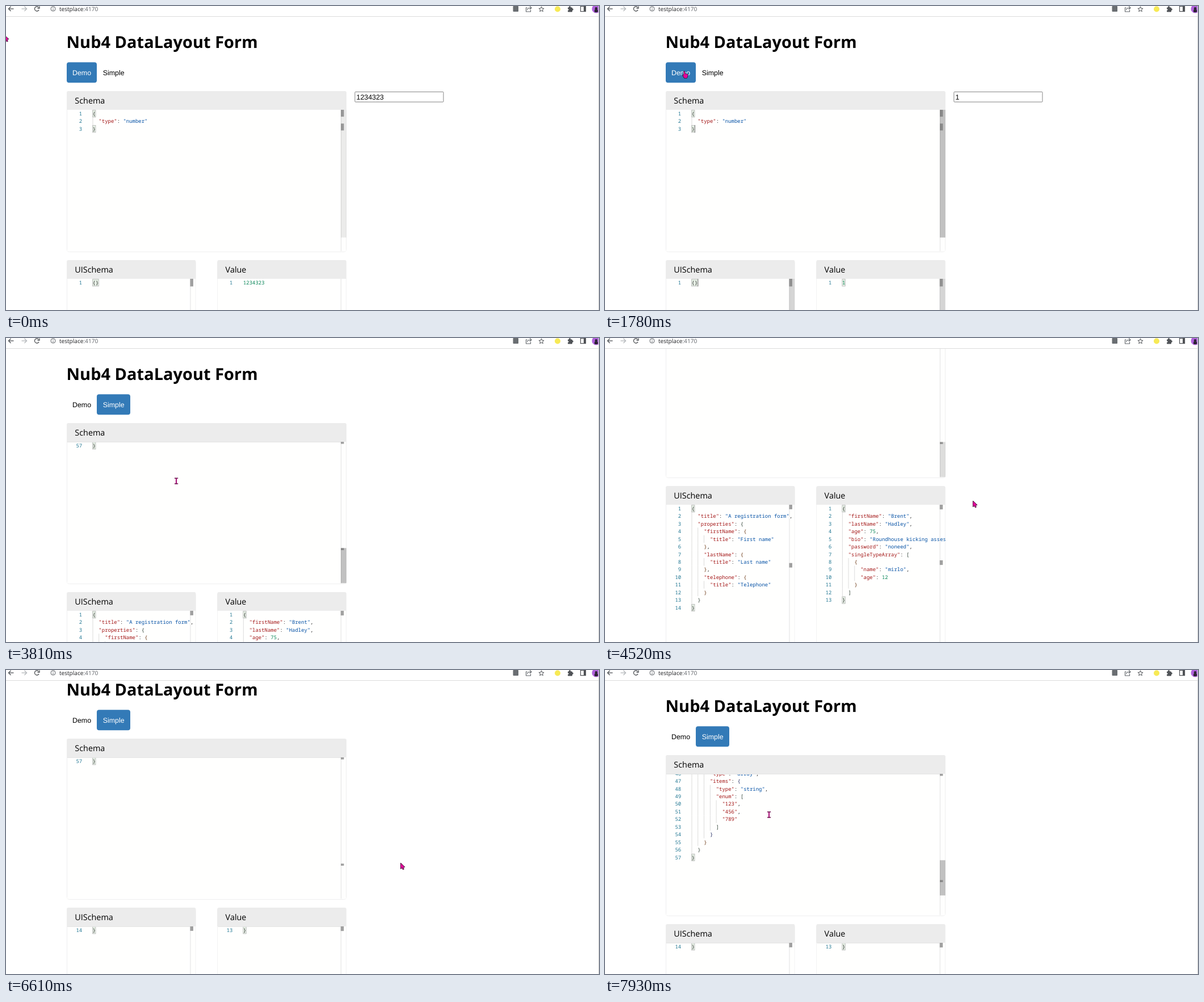
An HTML page with a canvas that plays this animation: 1045 px wide and 536 px high, repeating every 8000 ms.

```html
<!DOCTYPE html>
<html lang="en">
<head>
<meta charset="utf-8">
<title>Form demo</title>
<style>
html, body { margin: 0; width: 100%; height: 100%; overflow: hidden; background: #fff; }
canvas { display: block; width: 1045px; height: 536px; }
</style>
</head>
<body>
<canvas id="stage"></canvas>
<script>
const W = 1045, H = 536, LOOP = 8000;
const LINE = 13.44, CH = 5.385, VIEW = 249.5;
const SANS = '"Open Sans", "Noto Sans", sans-serif';
const ARIAL = '"Liberation Sans", Arial, sans-serif';
const MONO = '8.97px "Noto Sans Mono", "DejaVu Sans Mono", monospace';
const BRACKETS = ['#333', '#33453a', '#6b3814', '#202a60', '#33453a', '#6b3814'];

const canvas = document.getElementById('stage');
const dpr = window.devicePixelRatio || 1;
canvas.width = W * dpr;
canvas.height = H * dpr;
const ctx = canvas.getContext('2d');
ctx.scale(dpr, dpr);
if ('textRendering' in ctx) ctx.textRendering = 'geometricPrecision';

// Documents shown in the editors
const str = { type: 'string' }, num = { type: 'number' };
const lines = data => JSON.stringify(data, null, 2).split('\n');
const simpleDocs = {
  schema: lines({
    description: 'A simple form example.',
    type: 'object',
    required: ['firstName', 'lastName'],
    properties: {
      firstName: { type: 'string', default: 'Brent' },
      lastName: str,
      telephone: { type: 'string', minLength: 10 },
      staticArray: { type: 'array', items: [str, num] },
      singleTypeArray: {
        type: 'array',
        items: { type: 'object', properties: { name: str, age: num } }
      },
      multiSelectArray: {
        type: 'array',
        items: { type: 'string', enum: ['123', '456', '789'] }
      }
    }
  }),
  ui: lines({
    title: 'A registration form',
    properties: {
      firstName: { title: 'First name' },
      lastName: { title: 'Last name' },
      telephone: { title: 'Telephone' }
    }
  }),
  value: lines({
    firstName: 'Brent',
    lastName: 'Hadley',
    age: 75,
    bio: 'Roundhouse kicking asses since 1940',
    password: 'noneed',
    singleTypeArray: [{ name: 'mirlo', age: 12 }]
  })
};
const demoDocs = value => ({ schema: lines(num), ui: lines({}), value: lines(value) });

// Moments when the picture moves on: [first, last, count]
const steps = [0];
for (const [a, b, n] of [
  [120, 770, 6], [1050, 1780, 6], [1900, 2020, 2], [2170, 2170, 1], [2440, 3110, 6],
  [3260, 3410, 2], [3530, 3810, 3], [4090, 4520, 4], [4640, 5040, 4], [5190, 5770, 5],
  [6040, 6310, 3], [6610, 6610, 1], [6730, 7530, 7], [7660, 7930, 3]
]) for (let i = 0; i < n; i++) steps.push(n > 1 ? a + (b - a) * i / (n - 1) : a);

// Keys: [time, value, ...]
const mouse = [
  [0, -3, 51], [770, 183, 119], [1488, 183, 119], [1634, 142, 121], [1780, 141, 121],
  [2020, 185, 119], [2170, 183, 120], [2440, 183, 120], [2842, 285, 205], [2974, 300, 252],
  [3810, 300, 252], [4090, 420, 262], [4376, 648, 287], [4640, 648, 287], [5040, 480, 400],
  [5480, 480, 400], [5770, 204, 348], [6175, 204, 348], [6310, 695, 340], [6863, 695, 340],
  [7396, 97, 160], [7530, 118, 114], [7660, 200, 150], [7795, 285, 240], [7930, 289, 255]
];
const pageKeys = [[4376, 0], [4520, 187], [4640, 194], [6310, 194], [6610, 29], [6730, 0]];
const scrollKeys = {
  schema: [[2842, 0], [3110, 174.7], [3410, 430], [3810, 752.6], [7660, 752.6], [7795, 655], [7930, 612]],
  ui: [[5770, 0], [6175, 174.7]],
  value: [[5040, 0], [5480, 161.3]]
};
const fadeKeys = {
  schema: [[0, .13], [250, 0], [1049, 0], [1050, .4], [1800, .4], [2170, .06], [2439, .06], [2440, .4],
    [4233, .4], [4520, .22], [4780, 0], [7660, 0], [7790, .4]],
  ui: [[1049, 0], [1050, .4], [1488, .4], [1780, .27], [2170, 0], [2439, 0], [2440, .4], [2840, .4],
    [3110, .27], [3530, 0], [5480, 0], [5620, .4], [6310, .4], [6600, 0]],
  value: [[1049, 0], [1050, .4], [1488, .4], [1780, .27], [2170, 0], [2439, 0], [2440, .4], [2840, .4],
    [3110, .27], [3530, 0], [4773, 0], [5040, .4], [5480, .4], [5770, .2], [6040, 0]]
};

function at(keys, t, k = 1) {
  if (t <= keys[0][0]) return keys[0][k];
  for (let i = 1; i < keys.length; i++) {
    const a = keys[i - 1], b = keys[i];
    if (t <= b[0]) return a[k] + (b[k] - a[k]) * (t - a[0]) / (b[0] - a[0]);
  }
  return keys[keys.length - 1][k];
}

function rect(x, y, w, h, color) {
  ctx.fillStyle = color;
  ctx.fillRect(x, y, w, h);
}

function round(x, y, w, h, r, color) {
  ctx.fillStyle = color;
  ctx.beginPath();
  ctx.roundRect(x, y, w, h, r);
  ctx.fill();
}

function text(s, x, y, font, color, align = 'left') {
  ctx.font = font;
  ctx.fillStyle = color;
  ctx.textAlign = align;
  ctx.fillText(s, x, y);
}

function path(points, color, width, close) {
  ctx.beginPath();
  points.forEach(([x, y]) => ctx.lineTo(x, y));
  if (close) ctx.closePath();
  ctx.strokeStyle = color;
  ctx.lineWidth = width;
  ctx.stroke();
}

function arc(x, y, r, color, width, from = 0, to = Math.PI * 2) {
  ctx.beginPath();
  ctx.arc(x, y, r, from, to);
  ctx.strokeStyle = color;
  ctx.lineWidth = width;
  ctx.stroke();
}

function disc(x, y, r, color) {
  ctx.fillStyle = color;
  ctx.beginPath();
  ctx.arc(x, y, r, 0, Math.PI * 2);
  ctx.fill();
}

function matchBox(x, y, cols) {
  rect(x, y + .5, cols * CH, LINE - 1, 'rgba(0,100,0,.1)');
  ctx.strokeStyle = '#b4b4b4';
  ctx.lineWidth = .8;
  ctx.strokeRect(x, y + .7, cols * CH, LINE - 1.2);
}

function codeLine(line, x, y) {
  const indent = line.search(/\S/);
  for (let c = 0; c < indent; c += 2) rect(x + c * CH, y, .8, LINE, '#d3d3d3');
  for (const m of line.matchAll(/"[^"]*"|\d+|[{}\[\]]|[:,]/g)) {
    const s = m[0];
    let color = '#222';
    if (s[0] === '"') color = line.slice(0, m.index).endsWith(': ') ? '#0451a5' : '#a31515';
    else if (/\d/.test(s)) color = '#098658';
    else if (/[{}\[\]]/.test(s)) color = BRACKETS[indent / 2];
    text(s, x + m.index * CH, y + 9.9, MONO, color);
  }
}

function panel(name, title, x, y, w, doc, t, fresh) {
  const top = y + 33, ruler = x + w - 10, tx = x + 45.6;
  const scroll = at(scrollKeys[name], t), fade = at(fadeKeys[name], t);
  const n = doc.length, full = VIEW + (n - 1) * LINE, ratio = VIEW / full;
  const plain = /^\d/.test(doc[0]), boxed = !plain || fresh;

  ctx.strokeStyle = '#efefef';
  ctx.lineWidth = 1;
  ctx.beginPath();
  ctx.roundRect(x + .5, y + .5, w - 1, VIEW + 33.5, 4);
  ctx.stroke();
  round(x, y, w, 33, [3, 3, 0, 0], '#ececec');
  text(title, x + 14.3, y + 21.8, '14.4px ' + SANS, '#000');

  ctx.save();
  ctx.beginPath();
  ctx.rect(x + 1, top, w - 1, VIEW);
  ctx.clip();
  rect(x + 1, top, w - 2, VIEW, '#fffffe');
  doc.forEach((line, i) => {
    const ly = top + i * LINE - scroll;
    if (ly < top - LINE || ly > top + VIEW) return;
    if (boxed && n === 1) matchBox(tx, ly, line.length);
    else if (boxed && (i === 0 || i === n - 1)) matchBox(tx, ly, 1);
    text(i + 1, x + 27.2, ly + 9.9, MONO, '#237893', 'right');
    codeLine(line, tx, ly);
    if (fresh && !plain && i === n - 1) rect(tx + line.length * CH, ly, 1, LINE, '#777');
  });
  if (scroll > 0) rect(x + 1, top, w - 11, 1, '#e4e4e4');

  rect(ruler, top, 1, VIEW, '#e2e2e2');
  if (boxed) {
    const h = Math.max(3.6, LINE * ratio);
    rect(ruler, top, 5.5, h, '#a0a0a0');
    if (n > 1) rect(ruler, top + (n - 1) * LINE * ratio, 5.5, h, '#a0a0a0');
  }
  if (fade > 0) {
    const color = `rgba(100,100,100,${fade})`;
    rect(ruler, top + scroll * ratio, 9.8, VIEW * ratio, color);
    const view = w - 55.5, wide = Math.max(...doc.map(l => l.length)) * CH + 18;
    if (wide > view) rect(tx, top + VIEW - 7, view * view / wide, 7, color);
  }
  ctx.restore();
}

function toolbar() {
  rect(0, 0, W, 19, '#fff');
  rect(0, 18, W, 1, '#dcdcdc');
  for (const [x, dir, color] of [[9, 1, '#505357'], [32, -1, '#b4b7ba']]) {
    path([[x - 4.5, 5], [x + 4.5, 5]], color, 1.3);
    path([[x - .5 * dir, 1], [x - 4.5 * dir, 5], [x - .5 * dir, 9]], color, 1.3);
  }
  arc(54.5, 5, 4, '#505357', 1.3, .5, 5.6);
  path([[55.5, 4], [59, 4], [59, .5]], '#505357', 1.3);
  arc(83, 5, 4, '#5f6368', 1);
  rect(82.5, 4.5, 1, 3, '#5f6368');
  rect(82.5, 2.5, 1, 1, '#5f6368');
  text('testplace', 94, 9, '10.1px ' + SANS, '#202124');
  const end = 94 + ctx.measureText('testplace').width;
  text(':4170', end, 9, '10.1px ' + SANS, '#5f6368');

  round(893.5, 0, 9.5, 10, 1, '#6a6e72');
  path([[918.5, 3], [916.5, 3], [916.5, 10], [924.5, 10], [924.5, 7]], '#5f6368', 1.1);
  path([[918.5, 7], [920, 4], [926, 3.2]], '#5f6368', 1.1);
  path([[923, .5], [926, 3.2], [923, 6]], '#5f6368', 1.1);
  const star = [];
  for (let i = 0; i < 10; i++) {
    const r = i % 2 ? 2.1 : 4.8, a = i * Math.PI / 5 - Math.PI / 2;
    star.push([943.5 + r * Math.cos(a), 5.8 + r * Math.sin(a)]);
  }
  path(star, '#505357', 1, true);
  disc(972, 5.5, 5, '#f7ea55');
  round(990, 2.5, 8, 8, 1, '#505357');
  disc(993.5, 2, 1.8, '#505357');
  disc(998, 6, 1.8, '#505357');
  disc(990.3, 6.5, 1.3, '#fff');
  ctx.strokeStyle = '#505357';
  ctx.lineWidth = 1.2;
  ctx.strokeRect(1012.5, .6, 9, 9);
  rect(1018, .6, 3.5, 9, '#505357');
  disc(1040, 5, 7.5, '#b062dc');
  disc(1040, 4.2, 2.2, '#2c2333');
  round(1037, 6, 6, 5, 1.5, '#2c2333');
  rect(1044, 0, 1, H, '#d4d4d4');
}

function shape(points) {
  ctx.lineJoin = 'round';
  path(points, '#2b1029', 1.4, true);
  ctx.fillStyle = '#e6009c';
  ctx.fill();
  ctx.lineJoin = 'miter';
}

function cursor(x, y, page) {
  const py = y + page;
  const inside = (l, r, top) => x > l && x < r && py > top && py < top + VIEW;
  const typing = inside(107, 590, 183) || inside(107, 324, 481) || inside(372, 590, 481);
  const tab = x > 107 && x < 219 && py > 99 && py < 135;
  ctx.save();
  ctx.translate(x, y);
  if (typing) {
    rect(-.9, -5, 1.9, 10.5, '#a3006f');
    rect(-3, -5.5, 6.2, 1.5, '#6d104f');
    rect(-3, 4.2, 6.2, 1.5, '#6d104f');
  } else if (tab) {
    shape([[-2, -5.5], [-.4, -5.5], [-.2, -1.5], [4, -.5], [4.8, .5], [4.2, 4], [3, 6],
      [-1, 6], [-4, 1.5], [-3.2, .5], [-2, 1.5]]);
  } else {
    shape([[.6, .8], [.6, 10.2], [3, 8.3], [4.6, 11.6], [6, 10.9], [4.6, 7.8], [7.5, 7.4]]);
  }
  ctx.restore();
}

function draw(t) {
  const simple = (t >= 1050 && t < 1600) || t >= 2440;
  const fresh = !simple && t >= 1600;
  const amount = fresh ? 1 : 1234323;
  const docs = simple ? simpleDocs : demoDocs(amount);
  const page = at(pageKeys, t);

  rect(0, 0, W, H, '#fff');
  ctx.save();
  ctx.translate(0, -page);
  text('Nub4 DataLayout Form', 106.5, 73.5, 'bold 29px ' + SANS, '#000');
  if (simple) round(160, 99.3, 59, 36, 4, '#337ab7');
  else round(107, 99.3, 53, 36, 4, '#337ab7');
  text('Demo', 117, 121.6, '12.4px ' + ARIAL, simple ? '#000' : '#fff');
  text('Simple', 170.7, 121.6, '12.4px ' + ARIAL, simple ? '#fff' : '#000');
  if (!simple) {
    ctx.strokeStyle = '#858585';
    ctx.lineWidth = 1;
    ctx.beginPath();
    ctx.roundRect(614.9, 151.4, 156, 17.8, 1);
    ctx.stroke();
    text(amount, 617.5, 164.5, '12.4px ' + ARIAL, '#000');
  }
  panel('schema', 'Schema', 107, 150, 493, docs.schema, t, fresh);
  panel('ui', 'UISchema', 107, 448, 227.5, docs.ui, t, fresh);
  panel('value', 'Value', 372.3, 448, 227.5, docs.value, t, fresh);
  ctx.restore();

  toolbar();
  cursor(at(mouse, t), at(mouse, t, 2), page);
}

function frame() {
  const now = performance.now() % LOOP;
  draw(steps.filter(s => s <= now + .5).pop());
  requestAnimationFrame(frame);
}
requestAnimationFrame(frame);
</script>
</body>
</html>
```
